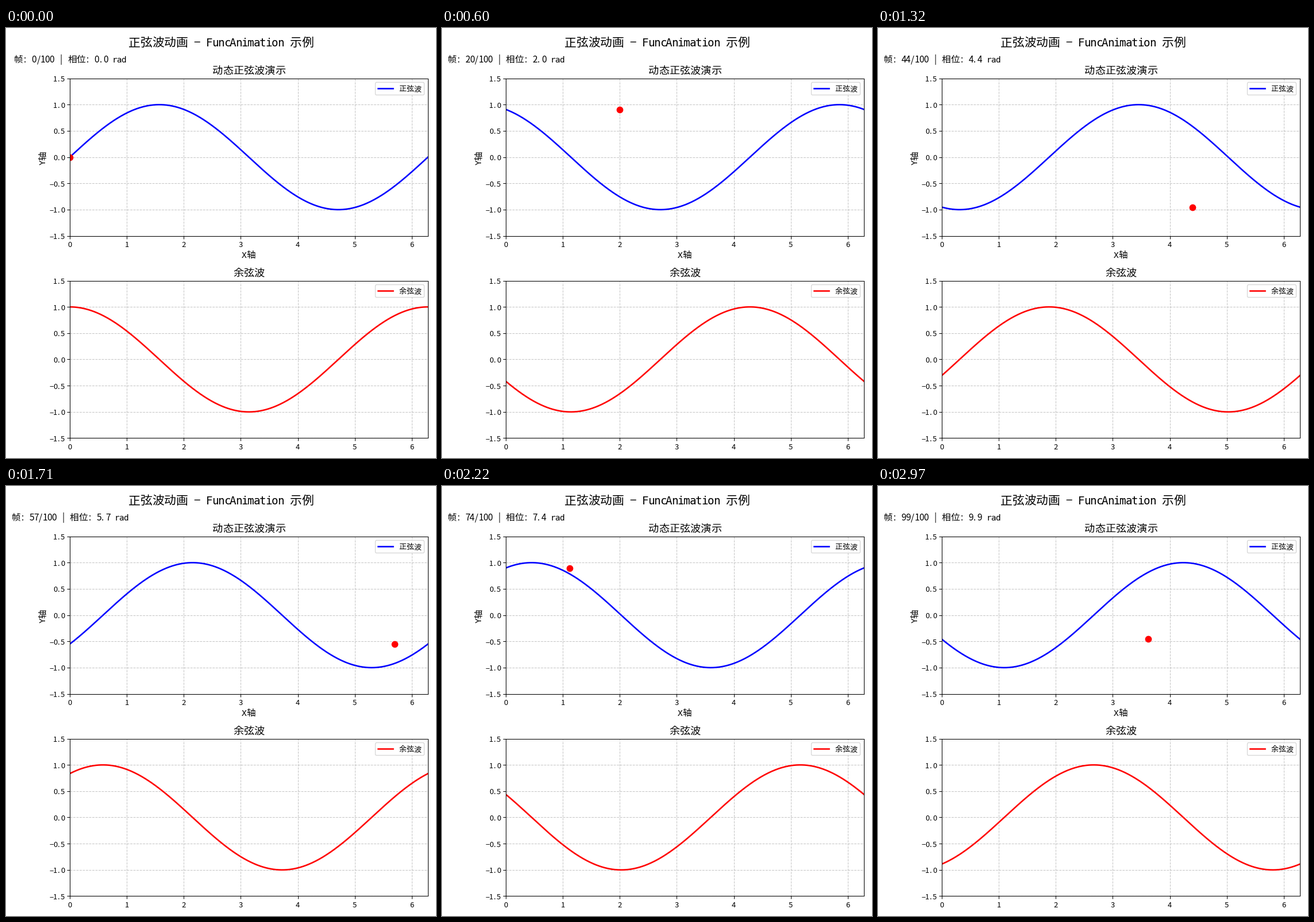
Recreate the animation shown at these times as a matplotlib script. Size 748 by 748 pixels, loop 3000 ms.

```python
import numpy as np
import matplotlib.pyplot as plt
from matplotlib.animation import FuncAnimation
from matplotlib.lines import Line2D
from matplotlib.patches import FancyBboxPatch
from matplotlib.transforms import Affine2D

SIDE = 748
DPI = 93.5
FRAMES = 100
TAU = 2 * np.pi
LEFT, RIGHT = 110.95, 733.96
MID = (LEFT + RIGHT) / 2
HEIGHT = 273.95

fig = plt.figure(figsize=(SIDE / DPI, SIDE / DPI), dpi=DPI, facecolor="white")
# Pixel coordinates with the origin at the top left
px = Affine2D().scale(1 / SIDE, -1 / SIDE).translate(0, 1) + fig.transFigure


def em(size):
    return size * DPI / 72


def cell(ch):
    return 1.0 if ord(ch) > 0x2E80 else 0.5


def put(x, y, text, size, align=0.5, upright=True):
    """Set text on a grid of full and half em cells, centred on the line y."""
    unit = em(size)
    pos = -align * unit * sum(map(cell, text))
    drop = 0.38 * unit
    items = []
    for ch in text:
        step = cell(ch) * unit
        if ch != " ":
            latin = ch.isascii() and ch.isalpha()
            along = pos + step * (0.38 if ch == "." else 0.5)
            at = (x + along, y + drop) if upright else (x + drop, y - along)
            items.append(fig.text(
                *at, ch, transform=px, ha="center", va="baseline",
                family="DejaVu Sans Mono" if latin else "Noto Sans CJK JP",
                size=size * 0.92 if latin else size,
                rotation=0 if upright else 90, rotation_mode="anchor"))
        pos += step
    return items


def legend(top, label, color):
    unit = em(10)
    width, height = 6.6 * unit, 22.2
    x, y = RIGHT - 0.5 * unit - width, top + 0.5 * unit
    fig.add_artist(FancyBboxPatch(
        (x, y), width, height, transform=px, fc="white", ec="0.8", lw=1,
        alpha=0.8, snap=True,
        boxstyle=f"round,pad=0,rounding_size={0.2 * unit}"))
    mid = y + height / 2
    start = x + 0.4 * unit
    fig.add_artist(Line2D([start, start + 2 * unit], [mid, mid],
                          transform=px, color=color, lw=2))
    put(start + 2.8 * unit, mid, label, 10, align=0)


def panel(top, title, label, color):
    ax = fig.add_axes([LEFT / SIDE, 1 - (top + HEIGHT) / SIDE,
                       (RIGHT - LEFT) / SIDE, HEIGHT / SIDE])
    ax.set(xlim=(0, TAU), ylim=(-1.5, 1.5),
           xticks=range(7), yticks=np.linspace(-1.5, 1.5, 7))
    ax.tick_params(labelbottom=False, labelleft=False)
    ax.grid(True, linestyle="--", alpha=0.7)
    for k in range(7):
        put(LEFT + k * (RIGHT - LEFT) / TAU, top + HEIGHT + 14.6, str(k), 10)
        value = f"{1.5 - k / 2:.1f}".replace("-", "\u2212")
        put(LEFT - 9, top + k * HEIGHT / 6 + 0.5, value, 10, align=1)
    put(MID, top - 14.6, title, 14)
    legend(top, label, color)
    return ax, ax.plot([], [], color=color, lw=2)[0]


ax, sine = panel(87.68, "动态正弦波演示", "正弦波", "blue")
_, cosine = panel(439.52, "余弦波", "余弦波", "red")
dot, = ax.plot([], [], "ro", markersize=8)

put(SIDE / 2, 24.3, "正弦波动画 \u2212 FuncAnimation 示例", 16)
put(MID, 394.3, "X轴", 12)
put(63, 226, "Y轴", 12, upright=False)

xs = np.linspace(0, TAU, 400)
status = []


def update(n):
    phase = n * 0.1
    sine.set_data(xs, np.sin(xs + phase))
    cosine.set_data(xs, np.cos(xs + phase))
    dot.set_data([phase % TAU], [np.sin(phase)])
    for item in status:
        item.remove()
    status[:] = put(LEFT, 54.3, f"帧: {n}/{FRAMES} | 相位: {phase:.1f} rad", 12)
    return [sine, cosine, dot, *status]


anim = FuncAnimation(fig, update, frames=FRAMES, interval=30,
                     init_func=lambda: update(0), repeat=True,
                     repeat_delay=0, blit=False)
plt.show()
```
